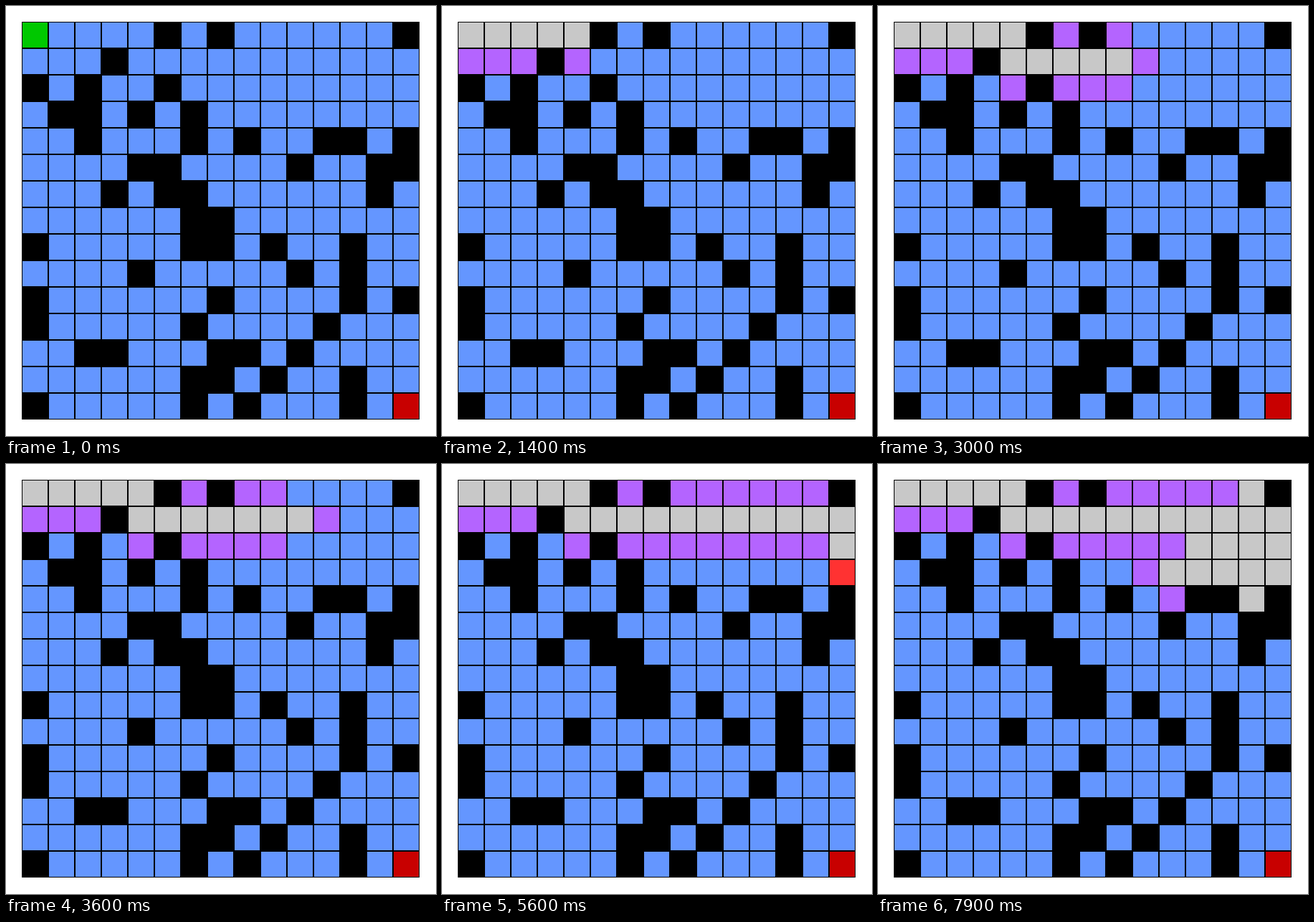
A matplotlib script for the animation above (8000 ms loop, 600 by 600 pixels).

```python
from itertools import islice

import matplotlib.pyplot as plt
from matplotlib.animation import FuncAnimation
from matplotlib.patches import Rectangle

STAGE, DPI = 600, 100
CELL, MARGIN = 37, 22
FRAMES, INTERVAL = 80, 100

FREE = "#6496ff"
START = "#00c800"
GOAL = "#c80000"
OPEN = "#b464ff"
CURRENT = "#ff3232"
CLOSED = "#c8c8c8"

# Level map: S start, G goal, # wall
LEVEL = """
S....#.#......#
...#...........
#.#..#.........
.##.#.#........
..#...#.#..##.#
....##....#..##
...#.##......#.
......##.......
#.....##.#..#..
....#.....#.#..
#......#....#.#
#.....#....#...
..##...##.#....
......##.#..#..
#.....#.#...#.G
""".split()
SIZE = len(LEVEL)
SYMBOLS = {".": FREE, "S": START, "G": GOAL}
BOARD = {(r, c): SYMBOLS[mark] for r, row in enumerate(LEVEL)
         for c, mark in enumerate(row) if mark in SYMBOLS}
FIRST, LAST = min(BOARD), max(BOARD)


def distance(cell):
    return abs(LAST[0] - cell[0]) + abs(LAST[1] - cell[1])


def neighbours(r, c):
    around = (r, c + 1), (r, c - 1), (r + 1, c), (r - 1, c)
    return [cell for cell in around if cell in BOARD]


def search():
    """Greedy best-first search, yielding the cell colours at every step."""
    colors = dict(BOARD)
    yield dict(colors)

    queue, closed = [FIRST], set()
    colors[FIRST] = OPEN
    yield dict(colors)

    while queue:
        cell = min(queue, key=distance)  # ties go to the oldest entry
        queue.remove(cell)
        colors[cell] = CURRENT
        yield dict(colors)
        if cell == LAST:
            return

        closed.add(cell)
        colors[cell] = CLOSED
        for near in neighbours(*cell):
            if near in closed:
                continue
            if near not in queue:
                queue.append(near)
            colors[near] = OPEN
            yield dict(colors)


states = list(islice(search(), FRAMES))

fig = plt.figure(figsize=(STAGE / DPI, STAGE / DPI), dpi=DPI,
                 facecolor="white")
ax = fig.add_axes([0, 0, 1, 1])
ax.set_xlim(0, STAGE)
ax.set_ylim(STAGE, 0)
ax.axis("off")


def add_square(x, y, side, color):
    return ax.add_patch(Rectangle((x, y), side, side, facecolor=color,
                                  edgecolor="none", linewidth=0))


# Black board; walls and grid lines are what the tiles leave uncovered
add_square(MARGIN, MARGIN, SIZE * CELL, "black")
tiles = {(r, c): add_square(MARGIN + c * CELL + 1, MARGIN + r * CELL + 1,
                            CELL - 2, color)
         for (r, c), color in BOARD.items()}


def draw(frame):
    for cell, color in states[frame].items():
        tiles[cell].set_facecolor(color)
    return list(tiles.values())


anim = FuncAnimation(fig, draw, frames=FRAMES, interval=INTERVAL,
                     init_func=lambda: draw(0), repeat=True, repeat_delay=0)
plt.show()
```
